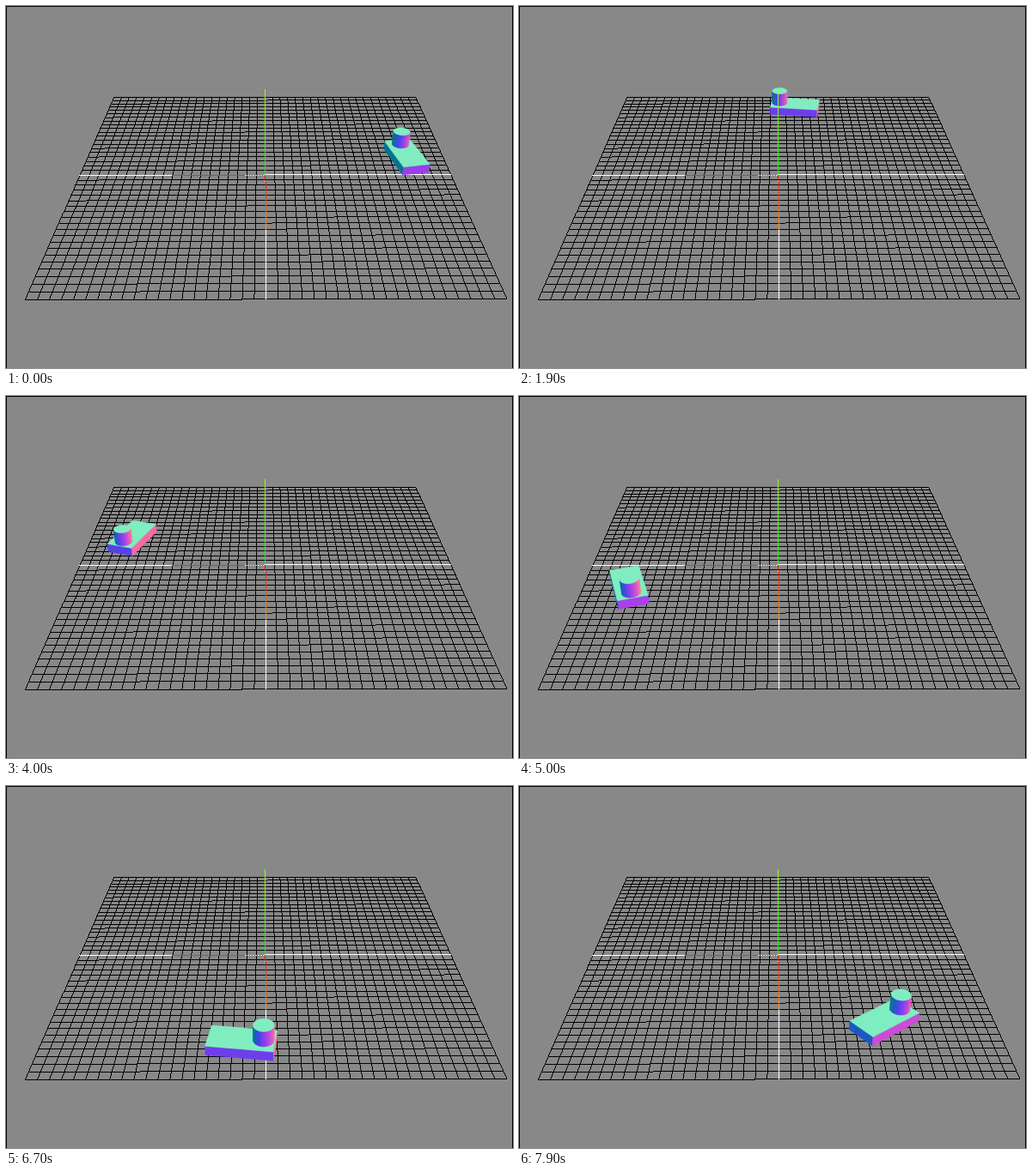
Animation, 590 px wide and 422 px high, one loop 8 s. Source, as an HTML page with a canvas:

```html
<!DOCTYPE html>
<html lang="en">
<head>
<meta charset="utf-8">
<title>Circling block</title>
<style>
  html, body { margin: 0; width: 100%; height: 100%; overflow: hidden; background: #888; }
  canvas { display: block; }
</style>
</head>
<body>
<canvas id="stage" width="590" height="422"></canvas>
<script>
const W = 590, H = 422;
const LOOP = 8000, STEP = 100;

// Camera: slightly yawed, pitched down at the origin; the floor spans -1..1 on X and Z.
const FOCAL = 804, DIST = 3.725, COS = 0.857, SIN = 0.517, YAW = 0.0035;
const CX = 301.95, CY = 197;
const EYE = [0, DIST * SIN, DIST * COS];

// Vehicle sizes and orbit.
const RADIUS = 0.798, HALF_LEN = 0.148, HALF_WID = 0.075, BASE = 0.003, DECK = 0.052;
const TOWER = { ahead: 0.097, r: 0.046, top: 0.133, sides: 32 };
const TURN = 3.75 * Math.PI / 180, LEAD = 2.95;

const ctx = document.getElementById('stage').getContext('2d');

function project([x, y, z]) {
  const side = x + YAW * z, near = z - YAW * x;
  const k = FOCAL / (DIST - COS * near - SIN * y);
  return [CX + side * k, CY - (COS * y - SIN * near) * k];
}

// Colour by view-space normal.
function shade([x, y, z]) {
  const view = [x, COS * y - SIN * z, SIN * y + COS * z];
  return `rgb(${view.map(n => Math.round(127.5 + 127.5 * n))})`;
}

function facesEye(normal, point) {
  return normal.reduce((sum, n, i) => sum + n * (EYE[i] - point[i]), 0) > 0;
}

function face(points, normal) {
  if (!facesEye(normal, points[0])) return;
  ctx.beginPath();
  points.forEach(p => ctx.lineTo(...project(p)));
  ctx.closePath();
  ctx.fillStyle = ctx.strokeStyle = shade(normal);
  ctx.lineWidth = 0.5;
  ctx.lineJoin = 'round';
  ctx.fill();
  ctx.stroke();
}

// Upright prism: ring of [x, z] corners, with one outward normal per side.
function prism(ring, normals, low, high) {
  ring.forEach(([x, z], i) => {
    const [x2, z2] = ring[(i + 1) % ring.length];
    face([[x, low, z], [x2, low, z2], [x2, high, z2], [x, high, z]], normals[i]);
  });
  face(ring.map(([x, z]) => [x, high, z]), [0, 1, 0]);
}

// Hard-edged one-pixel line; color may depend on the position along it.
function pixelLine(g, from, to, color) {
  const [x1, y1] = project(from), [x2, y2] = project(to);
  const n = Math.ceil(Math.max(Math.abs(x2 - x1), Math.abs(y2 - y1)));
  for (let i = 0; i <= n; i++) {
    const t = i / n;
    g.fillStyle = typeof color === 'function' ? color(t) : color;
    g.fillRect(Math.floor(x1 + (x2 - x1) * t), Math.floor(y1 + (y2 - y1) * t), 1, 1);
  }
}

function makeFloor() {
  const layer = document.createElement('canvas');
  layer.width = W;
  layer.height = H;
  const g = layer.getContext('2d');
  g.fillStyle = '#888';
  g.fillRect(0, 0, W, H);
  for (let i = -20; i <= 20; i++) {
    const p = i / 20;
    pixelLine(g, [p, 0, -1], [p, 0, 1], '#000');
    pixelLine(g, [-1, 0, p], [1, 0, p], '#000');
  }
  pixelLine(g, [0, 0, -1], [0, 0, 1], '#fff');
  pixelLine(g, [-1, 0, 0], [1, 0, 0], '#fff');
  pixelLine(g, [0, 0, 0], [-0.5, 0, 0],
    t => t < 0.22 && Math.round(t * 108) % 3 ? '#ddd' : '#666');
  pixelLine(g, [0, 0, 0], [0, 0, 0.5], t => `rgb(255,${Math.round(t * 153)},0)`);
  g.fillStyle = '#000';
  g.fillRect(0, 0, W, 1);
  g.fillRect(0, 0, 1, H);
  g.fillRect(W - 1, 0, 1, H);
  return layer;
}

function drawVehicle(angle) {
  const out = [Math.cos(angle), -Math.sin(angle)];
  const fwd = [-Math.sin(angle), -Math.cos(angle)];
  const at = (along, across) =>
    [0, 1].map(i => out[i] * (RADIUS + across) + fwd[i] * along);
  const flat = ([x, z], sign) => [x * sign, 0, z * sign];

  prism(
    [[1, 1], [1, -1], [-1, -1], [-1, 1]].map(([a, b]) => at(a * HALF_LEN, b * HALF_WID)),
    [flat(fwd, 1), flat(out, -1), flat(fwd, -1), flat(out, 1)],
    BASE, DECK
  );

  const [tx, tz] = at(TOWER.ahead, 0);
  const ring = [], normals = [];
  for (let i = 0; i < TOWER.sides; i++) {
    const a = i / TOWER.sides * 2 * Math.PI, mid = a + Math.PI / TOWER.sides;
    ring.push([tx + TOWER.r * Math.cos(a), tz + TOWER.r * Math.sin(a)]);
    normals.push([Math.cos(mid), 0, Math.sin(mid)]);
  }
  prism(ring, normals, DECK, TOWER.top);
}

const ground = makeFloor();

function draw() {
  const step = Math.floor(performance.now() % LOOP / STEP);
  ctx.drawImage(ground, 0, 0);
  drawVehicle((step + LEAD) * TURN);
  // The upright axis always stands in front of the far half of the orbit.
  pixelLine(ctx, [0, 0.01, 0], [0, 0.5, 0], t => `rgb(${Math.round(t * 153)},255,0)`);
  requestAnimationFrame(draw);
}
draw();
</script>
</body>
</html>
```
